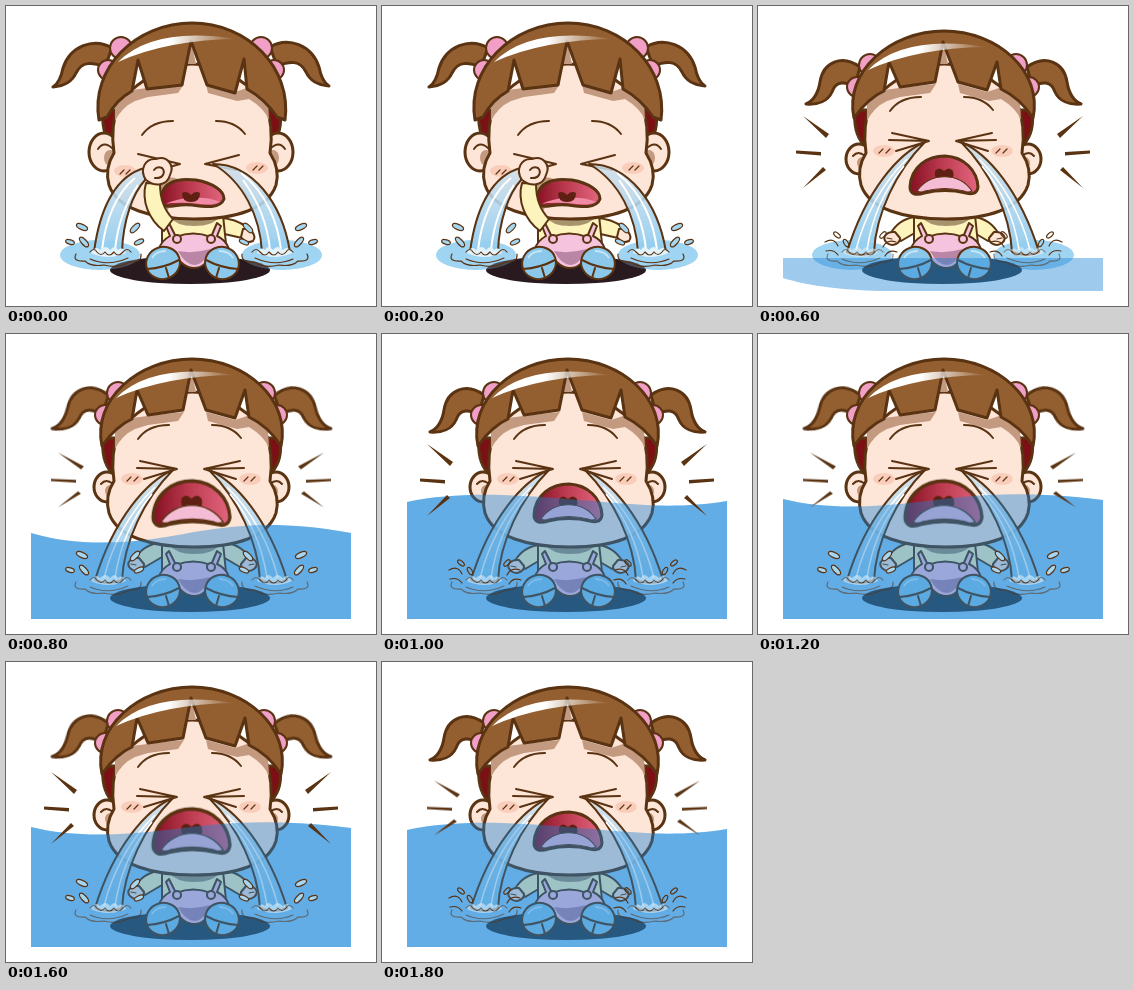
These frames come from a looping animation (370x300 px, 2 s). An HTML page:

```html
<!DOCTYPE html>
<html lang="en">
<head>
<meta charset="utf-8">
<title>Crying girl</title>
<style>
html, body { margin: 0; width: 100%; height: 100%; overflow: hidden; background: #fff; }
svg { display: block; width: 370px; height: 300px; }

.ink { stroke: #5a3312; stroke-linecap: round; stroke-linejoin: round; }
.w3 { stroke-width: 3; }
.w2 { stroke-width: 2; }
.w1 { stroke-width: 1.2; }
.line { fill: none; }
.skin { fill: #fde5d7; }
.hair { fill: #945f30; }
.bow { fill: #f29fc8; }
.shirt { fill: #fdf3bd; }
.pants { fill: #f6c3de; }
.shoe { fill: #8cc8ea; }
.red { fill: #7c1015; }
.shade { fill: #c39a80; }

.wipe, .wail, .open, .wide, .tall, .low, .left, .right, .back, .water, .shadow, .rays, .tail {
  animation: 2s step-end infinite;
}
.wipe { animation-name: wipe; }
.wail { animation-name: wail; }
.open, .low { animation-name: open; }
.wide { animation-name: wide; }
.tall { animation-name: tall; }
.left { animation-name: left; }
.right { animation-name: right; }
.back { animation-name: back; }
.water { animation-name: water; }
.shadow { animation-name: shadow; }
.rays { animation-name: rays; }
.tail { animation-name: tail; transform-origin: 95px 70px; }

@keyframes wipe { 0% { opacity: 1 } 30%, 100% { opacity: 0 } }
@keyframes wail { 0% { opacity: 0 } 30%, 100% { opacity: 1 } }
@keyframes back { 0% { opacity: 0 } 35%, 100% { opacity: 1 } }
@keyframes open {
  0%, 40%, 60%, 80% { opacity: 0 }
  30%, 50%, 70%, 90%, 100% { opacity: 1 }
}
@keyframes wide {
  0%, 50%, 70%, 90%, 100% { opacity: 0 }
  40%, 60%, 80% { opacity: 1 }
}
@keyframes tall {
  0%, 40%, 60%, 80% { opacity: 1 }
  30%, 50%, 70%, 90%, 100% { opacity: 0 }
}
@keyframes shadow { 0% { fill: #281a1e } 30%, 100% { fill: #333b42 } }
@keyframes left {
  0% { rx: 40px; ry: 15px; cx: 94px; cy: 249px }
  10% { rx: 62px; ry: 25px; cx: 98px; cy: 249px }
  20% { rx: 95px; ry: 35px; cx: 91px; cy: 248px }
  30%, 100% { rx: 125px; ry: 40px; cx: 80px; cy: 254px }
}
@keyframes right {
  0% { rx: 40px; ry: 15px; cx: 276px; cy: 249px }
  10% { rx: 62px; ry: 26px; cx: 273px; cy: 251px }
  20% { rx: 100px; ry: 40px; cx: 289px; cy: 252px }
  30%, 100% { rx: 140px; ry: 46px; cx: 292px; cy: 257px }
}
@keyframes water {
  0% { d: path("M25 252 H345 V285 H130 C90 285 50 280 25 272Z") }
  35% { d: path("M25 226 C75 216 120 220 185 225 S290 234 345 225 V285 H25Z") }
  40% { d: path("M25 199 C65 211 110 211 160 203 S255 183 345 199 V285 H25Z") }
  45% { d: path("M25 182 C65 192 110 191 160 184 S255 167 345 182 V285 H25Z") }
  50%, 70%, 90%, 100% { d: path("M25 168 C75 158 120 160 185 165 S290 176 345 167 V285 H25Z") }
  60%, 80% { d: path("M25 165 C65 175 110 174 160 168 S255 155 345 166 V285 H25Z") }
}
@keyframes rays {
  0%, 45%, 50%, 70%, 80% { transform: none }
  35%, 40%, 60%, 90%, 100% { transform: translate(7px, 35px) scale(1, .76) }
}
@keyframes tail {
  0%, 50%, 70%, 90%, 100% { transform: none }
  40%, 60%, 80% { transform: rotate(4deg) }
}
</style>
</head>
<body>
<svg viewBox="0 0 370 300">
<defs>
  <clipPath id="stage"><rect x="25" y="0" width="320" height="285"/></clipPath>
  <linearGradient id="throat">
    <stop offset="0" stop-color="#861022"/><stop offset=".5" stop-color="#bf3d52"/><stop offset="1" stop-color="#e2667f"/>
  </linearGradient>
  <linearGradient id="tear" x1="0" y1="0" x2="0" y2="1">
    <stop offset="0" stop-color="#cfe0ec" stop-opacity=".85"/><stop offset="1" stop-color="#8fcbee" stop-opacity=".95"/>
  </linearGradient>
  <linearGradient id="shine">
    <stop offset=".1" stop-color="#fff"/><stop offset=".45" stop-color="#fff"/><stop offset="1" stop-color="#fff" stop-opacity="0"/>
  </linearGradient>

  <path id="tailUp" class="ink w3 hair" d="M106 42 C88 31 64 40 57 62 C55 72 52 78 47 81 C59 80 66 76 70 67 C76 55 86 56 99 61Z"/>
  <path id="tailDown" class="ink w3 hair" d="M102 61 C84 48 65 56 62 76 C60 88 55 95 48 98 C60 99 70 95 74 86 C78 74 87 76 97 80Z"/>
  <g id="bows" class="ink w2 bow"><circle cx="115" cy="42" r="11"/><circle cx="102" cy="64" r="10"/></g>
  <path id="gloss" fill="url(#shine)" d="M112 56 Q148 20 230 33 Q160 34 112 56Z"/>

  <path id="sides" class="ink w3 red" d="M97 104 Q95 126 105 138 L266 138 Q277 126 274 104Z"/>
  <g id="face">
    <path class="ink w3 skin" d="M113 96 Q104 120 108 147 C101 158 100 168 103 179 C111 203 146 213 188 213 C230 213 262 203 270 179 C273 168 271 158 264 147 Q268 120 259 96 Q186 20 113 96Z"/>
    <path class="shade" d="M109 115 Q116 101 129 95 L142 91 172 87 178 78 141 82 126 84 109 98Z M202 87 L231 95 243 93 Q258 102 263 114 L262 96 241 82 229 86 200 78Z M185 34 L180 58 190 58Z"/>
  </g>
  <g id="brows" class="ink w2 line"><path d="M132 105 Q142 91 163 91 M206 91 Q225 91 235 104"/></g>

  <g id="shoe">
    <ellipse class="ink w2 shoe" cx="157" cy="257" rx="17" ry="16" transform="rotate(-18 157 257)"/>
    <path class="ink w2 line" d="M141 263 Q158 262 173 254 M160 262 L163 272"/>
    <path d="M146 252 Q150 245 160 245" fill="none" stroke="#c5e6f8" stroke-width="2"/>
  </g>
  <g id="body">
    <path class="ink w2 shirt" d="M156 209 H217 L220 238 H156Z"/>
    <path fill="#a8936f" d="M162 210 H214 Q208 220 188 220 Q170 220 162 210Z"/>
    <path class="ink w2 pants" d="M163 217 L170 231 Q187 224 205 231 L211 217 215 220 211 230 Q220 234 223 243 L206 246 Q200 262 188 262 Q176 262 168 246 L153 243 Q155 235 164 230 L160 220Z"/>
    <path fill="#b986a6" d="M172 245 Q188 248 204 243 Q198 259 188 259 Q179 258 172 245Z"/>
    <g class="ink w2 pants"><circle cx="171" cy="233" r="4"/><circle cx="205" cy="233" r="4"/></g>
    <use href="#shoe"/><use href="#shoe" transform="matrix(-1 0 0 1 373 0)"/>
  </g>

  <g id="fist">
    <path class="ink w2 shirt" d="M160 211 C148 211 139 218 134 225 L143 235 160 225Z"/>
    <path class="ink w2 skin" d="M137 226 C128 225 123 232 129 237 C134 241 142 238 142 232Z"/>
    <path class="ink w1 line" d="M129 232 L134 233"/>
  </g>
  <g id="mouth">
    <path class="ink w3" fill="url(#throat)" d="M152 181 C153 160 170 150 187 150 C206 151 219 164 220 181 C219 189 212 188 208 187 Q187 182 166 187 C158 190 152 188 152 181Z"/>
    <path fill="#5f2013" d="M177 165 q-1 8 4 8 h10 q6 0 4 -8 q-4 -5 -9 0 q-5 -5 -9 0"/>
    <path class="ink w1" fill="#f5bcd6" d="M159 185 C172 166 201 166 214 185 Q210 187 206 185 Q187 180 167 185 Q163 187 159 185Z"/>
  </g>

  <g id="longTear">
    <path class="ink w2" fill="url(#tear)" d="M167 136 C141 147 108 184 89 246 Q102 252 116 246 C118 208 138 165 167 136Z"/>
    <path fill="none" stroke="#fff" stroke-width="1.5" d="M149 153 C123 178 106 212 98 244 M146 160 C124 186 113 217 109 244"/>
  </g>
  <g id="foam">
    <path fill="#e2f3fb" d="M85 247 q5 -8 9 -3 q6 -6 10 0 q5 -6 8 0 q5 -4 8 3 q-18 8 -35 0Z"/>
    <path class="ink w1 line" d="M84 246 q4 -5 7 0 q4 5 8 0 q4 6 9 0 q4 6 9 0 q4 -5 8 0 M84 253 q18 8 38 -1 M70 248 q-4 8 9 7 q6 6 19 4 q14 4 25 -3 q13 1 12 -8"/>
  </g>
  <g id="drops" class="ink w1" fill="#a5d7f3">
    <ellipse cx="76" cy="221" rx="6" ry="2.6" transform="rotate(25 76 221)"/>
    <ellipse cx="64" cy="236" rx="4.5" ry="2.2" transform="rotate(18 64 236)"/>
    <ellipse cx="78" cy="236" rx="6" ry="2.6" transform="rotate(48 78 236)"/>
    <ellipse cx="129" cy="222" rx="6" ry="2.6" transform="rotate(-45 129 222)"/>
    <ellipse cx="133" cy="236" rx="5" ry="2.2" transform="rotate(-25 133 236)"/>
  </g>
  <g id="curls" class="ink w1 line">
    <path d="M67 236 q9 -5 13 4 M68 245 q8 -2 12 4 M138 236 q-9 -3 -13 5 M139 246 q-8 -3 -12 4"/>
    <ellipse cx="79" cy="229" rx="4" ry="2" transform="rotate(40 79 229)"/>
    <ellipse cx="88" cy="237" rx="4" ry="2" transform="rotate(60 88 237)"/>
    <ellipse cx="125" cy="229" rx="4" ry="2" transform="rotate(-45 125 229)"/>
  </g>
  <path id="ray" fill="#5a3312" d="M45 110 L71 128 68 132Z M38 144.500 L63 146 63 149.500 38 147.500Z M45 182 L65 161 68 164Z"/>
  <g id="puddles" fill="#a0d4f3"><ellipse class="left"/><ellipse class="right"/></g>
</defs>

<g clip-path="url(#stage)">
  <use href="#puddles"/>
  <g class="back"><rect x="25" y="150" width="320" height="135" fill="#fff"/><path class="water" fill="#99cef5"/></g>
  <ellipse class="shadow" cx="184" cy="264" rx="80" ry="14"/>
  <g class="wipe"><use href="#puddles" opacity=".28"/></g>

  <g class="wipe">
    <use href="#tailUp"/><use href="#tailUp" transform="matrix(-1 0 0 1 370 -1)"/>
    <use href="#bows"/><use href="#bows" transform="matrix(-1 0 0 1 370 0)"/>
    <path class="ink w2 shirt" d="M212 212 C226 212 236 217 242 222 L236 232 214 227Z"/>
    <path class="ink w2 skin" d="M237 223 C245 221 251 230 247 235 Q240 238 235 231Z"/>
    <use href="#body"/>
    <use href="#sides"/>
    <g class="ink w3 skin"><ellipse cx="98" cy="146" rx="15" ry="19"/><ellipse cx="272" cy="146" rx="15" ry="19"/></g>
    <g class="shade"><ellipse cx="104" cy="152" rx="6" ry="8"/><ellipse cx="267" cy="152" rx="6" ry="8"/></g>
    <path class="ink w2 line" d="M92 143 Q98 134 107 143 M279 143 Q273 134 264 143"/>
    <use href="#face"/>
    <path class="ink w3 hair" d="M93 114 C84 62 130 17 186 17 C242 17 286 62 279 114 L271 111 Q259 93 241 83 L238 53 229 87 201 79 185 35 176 79 141 83 132 54 126 85 Q110 94 101 111Z"/>
    <use href="#gloss"/>
    <use href="#brows" transform="translate(4 24)"/>
    <g fill="#f6b79f" opacity=".5"><ellipse cx="119" cy="165" rx="11" ry="6"/><ellipse cx="251" cy="162" rx="11" ry="6"/></g>
    <path class="ink w1 line" d="M114 168 l4 -4 M120 168 l4 -4 M247 164 l4 -4 M253 164 l4 -4"/>
    <path class="ink w2 line" d="M132 148 L174 158 L160 162 M233 149 L199 158 L230 164"/>
    <path class="shade" d="M156 172 Q166 170 172 173 L162 204 152 204Z"/>
    <path class="ink w3" fill="url(#throat)" d="M156 187 C160 175 173 172 190 174 C206 177 218 184 218 193 C214 203 200 201 186 199 C172 197 162 203 157 199 C153 196 153 191 156 187Z"/>
    <path fill="#f08ba5" d="M160 198 C174 190 203 190 214 196 Q206 200 186 197 Q166 196 160 198Z"/>
    <path fill="#5f2013" d="M176 187 q0 9 9 9 q9 0 9 -9 q-5 -3 -9 2 q-4 -5 -9 -2"/>
    <path class="ink w2" fill="url(#tear)" d="M139 162 C111 169 94 200 88 246 Q102 252 116 246 C117 214 127 187 139 174Z"/>
    <path class="ink w2" fill="url(#tear)" d="M207 158 C246 158 276 196 284 246 Q270 252 256 246 C254 211 238 176 207 158Z"/>
    <path fill="none" stroke="#fff" stroke-width="2" d="M129 172 C109 188 99 217 96 244 M132 179 C116 202 111 224 109 244 M235 167 C261 187 272 218 275 244 M237 174 C255 199 262 223 264 244"/>
    <path class="ink w2 shirt" d="M140 177 C135 195 143 214 158 225 L167 213 C157 203 154 191 154 178Z"/>
    <path class="ink w2 skin" d="M140 174 C133 164 139 152 150 153 C161 149 169 159 164 169 C161 180 149 181 140 174Z"/>
    <path class="ink w2 line" d="M149 172 C157 173 160 166 156 162 Q151 160 148 164"/>
  </g>

  <g class="wail">
    <g class="tail"><use href="#tailDown"/></g>
    <g transform="matrix(-1 0 0 1 371 0)"><g class="tail"><use href="#tailDown"/></g></g>
    <use href="#bows" x="-3" y="17"/><use href="#bows" transform="matrix(-1 0 0 1 373 17)"/>
    <g class="open"><use href="#fist"/><use href="#fist" transform="matrix(-1 0 0 1 373 0)"/></g>
    <g class="wide"><use href="#fist" x="-4" y="-2"/><use href="#fist" transform="matrix(-1 0 0 1 377 -2)"/></g>
    <use href="#body"/>
    <use href="#sides"/>
    <g class="ink w3 skin"><ellipse cx="101" cy="153" rx="13" ry="15"/><ellipse cx="270" cy="153" rx="13" ry="15"/></g>
    <g class="shade"><ellipse cx="104" cy="157" rx="5" ry="6"/><ellipse cx="267" cy="157" rx="5" ry="6"/></g>
    <path class="ink w2 line" d="M95 150 Q100 144 107 150 M276 150 Q271 144 264 150"/>
    <use href="#face"/>
    <path class="ink w3 hair" d="M96 112 C86 66 132 25 186 25 C240 25 285 66 275 112 Q262 92 243 83 L239 56 229 84 200 76 185 36 177 76 142 81 131 56 126 85 Q110 92 96 112Z"/>
    <use href="#gloss" x="-2" y="8"/>
    <use href="#brows"/>
    <g fill="#f6b79f" opacity=".5"><ellipse cx="126" cy="145" rx="11" ry="6"/><ellipse cx="244" cy="145" rx="11" ry="6"/></g>
    <path class="ink w1 line" d="M121 147 l4 -4 M128 147 l4 -4 M238 147 l4 -4 M245 147 l4 -4"/>
    <path class="ink w2 line" d="M134 127 L171 135 L131 134 M171 135 L138 145 M234 127 L198 135 L238 134 M198 135 L230 145"/>
    <g class="open"><use href="#mouth"/></g>
    <g class="wide"><use href="#mouth" transform="translate(-24.7 -28.5) scale(1.13 1.17)"/></g>
    <use href="#longTear"/><use href="#longTear" transform="matrix(-1 0 0 1 370 0)"/>
    <path class="water" fill="#1882d4" fill-opacity=".42"/>
  </g>

  <g class="wipe"><use href="#foam"/><use href="#foam" transform="matrix(-1 0 0 1 371 0)"/></g>
  <g class="wail"><g opacity=".55"><use href="#foam"/><use href="#foam" transform="matrix(-1 0 0 1 371 0)"/></g></g>
  <g class="tall"><use href="#drops"/><use href="#drops" transform="matrix(-1 0 0 1 371 0)"/></g>
  <g class="low"><use href="#curls"/><use href="#curls" transform="matrix(-1 0 0 1 371 0)"/></g>
  <g class="wail">
    <g class="rays"><use href="#ray"/></g>
    <g transform="matrix(-1 0 0 1 370 0)"><g class="rays"><use href="#ray"/></g></g>
  </g>
</g>
</svg>
</body>
</html>
```
